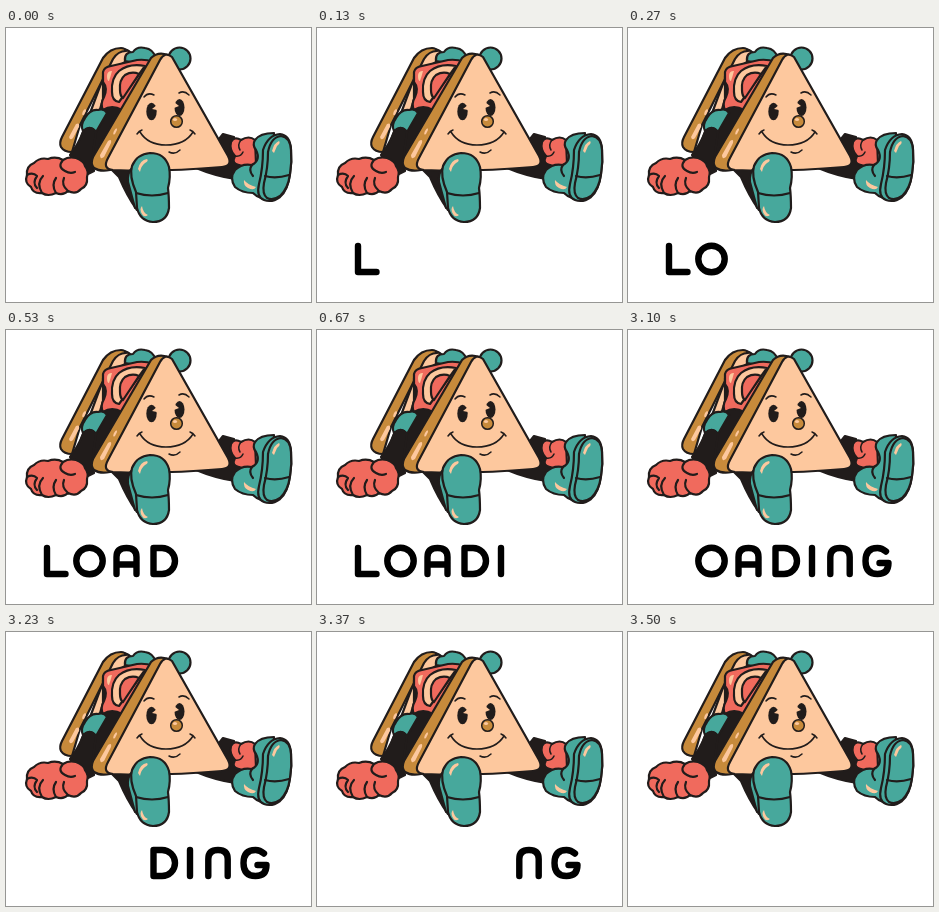
An HTML page for the animation above (4010 ms loop, 305 by 274 pixels).

```html
<!DOCTYPE html>
<html lang="en">
<head>
<meta charset="utf-8">
<title>Loading</title>
<style>
  html, body { margin: 0; width: 100%; height: 100%; overflow: hidden; background: #fff; }
  svg { display: block; width: 100%; height: 100%; }
  .ink { fill: none; stroke: #211c1b; stroke-width: 2.2; stroke-linecap: round; stroke-linejoin: round; }
  .thin { stroke-width: 1.5; }
  .black { fill: #211c1b; }
  .teal { fill: #47a89c; }
  .coral { fill: #f06a5d; }
  .bread { fill: #fdc89e; }
  .crust { fill: #c78a3b; }
  .shine { fill: #fdc89e; stroke: none; }
  #word { fill: none; stroke: #000; stroke-width: 6.4; stroke-linecap: round; stroke-linejoin: round; }
</style>
</head>
<body>
<svg viewBox="0 0 305 274" role="img" aria-label="Loading">
  <g class="ink">
    <!-- back slice -->
    <path class="bread" d="M106 26Q117 17 125 25L126 34L86 110L70 123Z"/>
    <path class="crust" d="M56 109L97 30Q104 20 115 20Q119 20 120 23Q112 23 107 31L74 97L66 124Q58 124 55 119Q53 115 56 109Z"/>
    <path class="shine" d="M63 109L70 96Q74 94 73 99L67 110Q64 113 63 109ZM77 83Q80 79 80 83L78 87Q75 88 77 83Z"/>

    <!-- filling -->
    <path class="black" d="M119 34L150 30L94 134L80 122L92 88L97 71V48Z"/>
    <path class="teal" d="M119 33Q118 24 127 24Q131 18 139 20Q147 21 150 30L142 37Z"/>
    <circle class="teal" cx="173.500" cy="30.500" r="11"/>
    <path class="coral" d="M97 44Q98 39 105 38L131 32Q140 31 147 34L116 82Q106 76 97 82Q94 76 98 69Q102 60 97 54Z"/>
    <path class="bread" d="M106 64Q105 50 113 43Q123 35 139 38L113 74Q106 73 106 64Z"/>
    <path class="coral" d="M114 62Q113 52 119 47Q126 43 133 46L117 70Q114 68 114 62Z"/>
    <path class="shine" d="M101 48Q101 43 106 43Q105 47 103 53Q101 53 101 48Z"/>
    <path class="teal" d="M79 90Q84 81 92 82Q98 80 101 85L90 104Q84 96 77 103Q74 97 79 90Z"/>

    <!-- left arm and glove -->
    <path class="black" d="M77 104Q84 96 90 104L86 132L88 143L80 147L64 127Q72 117 77 104Z"/>
    <path class="coral" d="M57 132Q63 128 70 130Q78 133 79 138Q83 143 81 149Q82 158 75 161Q70 167 62 163Q57 168 50 165Q42 169 36 165Q27 166 25 159Q18 155 21 147Q20 138 28 135Q34 129 42 131Q50 128 57 132Z"/>
    <path d="M21 147Q27 144 31 148Q26 155 31 160M36 165Q30 155 37 148M50 165Q45 157 50 150M62 163Q55 157 58 150M57 132Q51 139 59 143Q64 146 69 144"/>

    <!-- legs and right arm -->
    <path class="black" d="M103 139L132 140L131 182Q121 168 113 149Z"/>
    <path class="black" d="M190 140L217 106L228 109L230 136L240 143L229 151Q209 148 190 140Z"/>

    <!-- front slice -->
    <path class="crust" d="M145 30Q152 23 162 27L104 142Q94 144 88 140Q84 136 87 129Z"/>
    <path class="bread" d="M154 32Q159 23 166 29L222 128Q227 138 216 139Q158 144 107 142Q96 141 102 130Z"/>
    <path class="shine" d="M94 127L102 113Q106 110 105 115L98 129Q94 132 94 127ZM108 103Q111 98 111 102L109 106Q106 108 108 103Z"/>

    <!-- face -->
    <ellipse class="black" cx="145.500" cy="83.500" rx="5.200" ry="8.800" stroke="none"/>
    <ellipse class="black" cx="173.500" cy="79.500" rx="5" ry="8.600" stroke="none"/>
    <path class="shine" d="M146 81L151 77V82ZM173 78L168 74V80Z"/>
    <circle class="crust thin" cx="170.500" cy="93.500" r="5.800"/>
    <ellipse class="shine" cx="169" cy="91.500" rx="2.100" ry="1.600"/>
    <path class="thin" d="M138 69Q142 64 148 67M173 65Q178 62 183 67M134 104Q142 117 160 117Q179 117 187 104M131 106Q133 103 136 102M184 102Q187 103 189 106M163 124Q169 127 174 122"/>

    <!-- left boot -->
    <path class="teal" d="M126 140Q121 145 122 154L129 180H139V142Z"/>
    <path class="teal" d="M126 138Q131 126 144 125Q159 125 163 139Q165 149 162 160Q163 168 163 180Q161 194 147 194Q134 193 131 180L130 164Q123 148 126 138Z"/>
    <path d="M130 165Q146 170 162 165"/>
    <path class="shine" d="M132 141Q134 132 141 131Q143 133 139 135Q135 138 134 144ZM136 178Q137 185 142 187Q138 190 136 186Q133 181 136 178Z"/>

    <!-- right glove and boot -->
    <path class="coral" d="M225 114Q228 108 235 112Q243 107 249 112L250 135Q240 141 233 137Q225 136 229 128Q223 122 225 114Z"/>
    <path class="thin" d="M235 112Q231 117 234 122M229 128Q235 129 237 124"/>
    <path class="teal" d="M249 112Q254 105 268 105L267 171Q254 172 247 165Q236 165 229 159Q223 150 229 142Q236 135 246 137Q255 132 250 122Q246 117 249 112Z"/>
    <path class="teal" d="M257 122Q262 107 274 106Q284 107 285 121Q286 134 284 146Q282 162 274 169Q266 175 258 172Q250 169 253 156Q257 140 257 122Z"/>
    <path class="teal" d="M262 124Q265 109 275 108Q284 109 285 122Q286 134 284 146Q282 161 274 168Q267 173 261 170Q256 166 258 155Q262 140 262 124Z"/>
    <path d="M259 148Q270 151 283 147M246 137Q242 142 247 148"/>
    <path class="shine" d="M238 152Q242 157 250 159Q248 163 242 160Q237 157 238 152ZM266 123Q268 115 273 113Q275 115 271 118L268 125Z"/>
  </g>
  <g id="word">
    <path d="M41 218V244H59.500"/>
    <ellipse cx="83.500" cy="231" rx="13.200" ry="13.300"/>
    <path d="M110.500 244V227Q110.500 218 120.500 218T130.500 227V244M110.500 234.500H130.500"/>
    <path d="M147.500 218H156a13 13 0 0 1 0 26H147.500Z"/>
    <path d="M184 218V244"/>
    <path d="M202.300 244V227Q202.300 218 212 218T221.700 227V244"/>
    <path d="M258 221.500Q254 218 249.500 218Q237.500 218 237.500 231T249.500 244Q260.500 244 260.500 233H251.500"/>
  </g>
</svg>
<script>
  const LOOP = 4010;
  const shows = [130, 270, 400, 530, 670, 800, 900];
  const hides = [3100, 3170, 3230, 3300, 3370, 3470, 3500];
  const letters = [...document.querySelector("#word").children];

  function draw() {
    const t = performance.now() % LOOP;
    letters.forEach((letter, i) => {
      letter.style.visibility = t >= shows[i] && t < hides[i] ? "visible" : "hidden";
    });
    requestAnimationFrame(draw);
  }
  draw();
</script>
</body>
</html>
```
